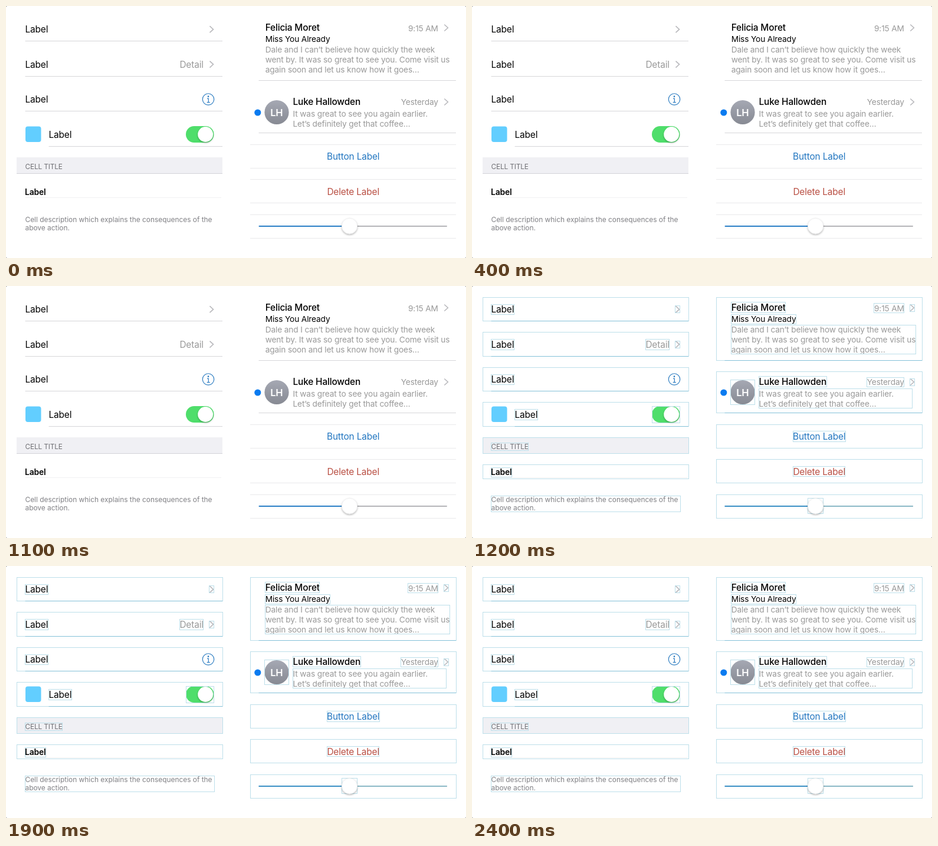
An HTML page for the animation above (2.5 s loop, 780 by 428 pixels).

```html
<!DOCTYPE html>
<html lang="en">
<head>
<meta charset="utf-8">
<title>Table cells</title>
<style>
  html, body { margin: 0; width: 100%; height: 100%; overflow: hidden; background: #fff; }
  svg { display: block; width: 780px; height: 428px; background: #8a8a8a; }
  text {
    font-family: Inter, Roboto, "Liberation Sans", sans-serif;
    font-size: 15.4px; letter-spacing: -0.01em; white-space: pre;
  }
  .strong { font-weight: 500; }
  .small { font-weight: 600; font-size: 13.8px; }
  .body { font-size: 13.7px; }
  .gray { fill: #999; }
  .note { font-size: 11.9px; letter-spacing: 0; fill: #808085; }
  .head { font-size: 11.8px; fill: #707075; }
  .initials { font-size: 16.5px; font-weight: 600; fill: #fff; }
  .mid { text-anchor: middle; }
  .end { text-anchor: end; }
  .blue { fill: #2276c0; }
  .red { fill: #b94f43; }
  #guides { animation: reveal 2500ms step-end infinite; }
  @keyframes reveal { 0% { opacity: 0; } 48%, 100% { opacity: 1; } }
</style>
</head>
<body>
<svg viewBox="0 0 780 428">
  <defs>
    <linearGradient id="silver" x1="0" y1="0" x2="0" y2="1">
      <stop offset="0" stop-color="#a5a8b3"/>
      <stop offset="1" stop-color="#878a93"/>
    </linearGradient>
    <filter id="shade" x="-30%" y="-30%" width="160%" height="170%">
      <feDropShadow dx="0" dy="1.6" stdDeviation="1.4" flood-color="#000" flood-opacity=".3"/>
    </filter>
  </defs>
  <rect width="780" height="428" rx="2.5" fill="#fff"/>
  <g id="cells"></g>
  <g id="guides"></g>
</svg>
<script>
const cells = document.getElementById('cells');
const guides = document.getElementById('guides');
const LEFT = 18, RIGHT = 414, WIDTH = 349, INSET = 14.5;
const PITCH = 59.4, ROW = 40.32;
const BLUE = '#2c7cc1';

function add(parent, tag, attrs, text) {
  const el = document.createElementNS('http://www.w3.org/2000/svg', tag);
  for (const key in attrs) el.setAttribute(key, attrs[key]);
  if (text) el.textContent = text;
  parent.append(el);
  return el;
}

const snap = v => Math.floor(v) + .5;
const block = (x, y, width, height, fill, rx = 0, parent = cells) =>
  add(parent, 'rect', { x, y, width, height, fill, rx });
const disc = (cx, cy, r, fill, extra) => add(cells, 'circle', { cx, cy, r, fill, ...extra });
const line = (d, stroke, width = 1, parent = cells) =>
  add(parent, 'path', { d, fill: 'none', stroke, 'stroke-width': width });

// Every part registers its own layout guide
function guide(x1, y1, x2, y2) {
  const x = snap(x1), y = snap(y1);
  add(guides, 'rect', {
    x, y, width: snap(x2) - x, height: snap(y2) - y, fill: 'none', stroke: '#bddfea'
  });
}

function divider(x1, x2, y, strong = true) {
  const d = `M${x1} ${snap(y)}H${x2}`;
  line(d, strong ? '#d6d6d9' : '#e9e9eb');
  if (strong) line(d, '#84c1d8', 1, guides);
}

function cell(x, y, h, indent) {
  guide(x, y, x + WIDTH, y + h);
  if (indent) divider(x + indent, x + WIDTH, y + h);
}

const write = (x, y, text, style) => add(cells, 'text', { x, y, class: style }, text);

// Text lines with one guide around them; `right` widens it to a column edge
function type(x, y, text, style = '', right = 0) {
  const lines = text.split('\n');
  const els = lines.map((t, i) => write(x, y, t, style));
  const size = parseFloat(getComputedStyle(els[0]).fontSize);
  const leading = size < 13 ? 14 : 16.9;
  els.forEach((el, i) => el.setAttribute('y', y + i * leading));
  const width = els[0].getComputedTextLength();
  const start = x - (style.includes('end') ? width : style.includes('mid') ? width / 2 : 0);
  const last = y + (lines.length - 1) * leading;
  guide(start, y - size * .92, right || start + width, last + size * .22);
}

function chevron(x, y) {
  line(`M${x} ${y - 5.5}l6 5.5l-6 5.5`, '#b9b9bd', 1.6);
  guide(x - 1, y - 6, x + 7, y + 6);
}

// Four standard rows
const rowTop = i => 19.5 + PITCH * i;
const rowMid = i => rowTop(i) + ROW / 2;
for (let i = 0; i < 4; i++) {
  const indent = i < 3 ? INSET : 54.5;
  cell(LEFT, rowTop(i), ROW, indent);
  type(LEFT + indent, rowMid(i) + 5.8, 'Label');
  if (i < 2) chevron(345.5, rowMid(i));
}
type(334.8, rowMid(1) + 5.8, 'Detail', 'gray end');

const infoY = rowMid(2);
disc(343, infoY, 9.7, 'none', { stroke: BLUE, 'stroke-width': 1.2 });
disc(343, infoY - 4.8, 1.3, BLUE);
line(`M341 ${infoY - 1.3}h2.3v6.3m-2.5 .2h5`, BLUE, 1.2);

block(33, 204.5, 26.5, 26.5, '#62ceff', 4);
block(305, 204, 47.5, 28, '#4fde6b', 14);
disc(338.2, 218, 12.9, '#fff', { filter: 'url(#shade)' });
guide(305, 204, 352.5, 232);

// Section
block(LEFT, 257, WIDTH, 28, '#f0f0f4');
line(`M${LEFT} 284.5h${WIDTH}`, '#d3d3d8');
cell(LEFT, 257, 27);
type(LEFT + INSET, 277, 'CELL TITLE', 'head');
line('M33 325.5H365', '#f1f1f2');
cell(LEFT, 303, 24);
type(LEFT + 14, 321, 'Label', 'small');
type(LEFT + INSET, 367,
  'Cell description which explains the consequences of the\nabove action.', 'note', 353);

// Messages
cell(RIGHT, 19, 107, INSET);
type(439.7, 42, 'Felicia Moret', 'strong');
type(732.8, 42.5, '9:15 AM', 'body gray end');
chevron(743.3, 37);
type(439.7, 61, 'Miss You Already', 'body');
type(439.7, 79,
  'Dale and I can’t believe how quickly the week\n' +
  'went by. It was so great to see you. Come visit us\n' +
  'again soon and let us know how it goes…', 'body gray', 752);

cell(RIGHT, 145, 70, INSET);
disc(426.8, 181, 5.6, '#0a7bf0');
disc(459, 180.5, 20.6, 'url(#silver)');
guide(438.4, 159.9, 479.6, 201.1);
write(458.8, 186.7, 'LH', 'initials mid');
type(486.5, 168, 'Luke Hallowden', 'strong');
type(732.8, 168, 'Yesterday', 'body gray end');
chevron(743.3, 163);
type(486.5, 187.6,
  'It was great to see you again earlier.\nLet’s definitely get that coffee…', 'body gray', 746);

// Buttons and slider share the row rhythm
for (let i = 0; i < 3; i++) {
  const y = 235.25 + PITCH * i;
  cell(RIGHT, y, ROW);
  [y, y + ROW].forEach(edge => divider(RIGHT, RIGHT + WIDTH, edge, false));
  const label = ['Button Label', 'Delete Label'][i];
  if (label) type(588.7, y + ROW / 2 + 5.7, label, 'mid ' + ['blue', 'red'][i]);
}

function track(parent, done, rest) {
  block(428.5, 373, 154, 2, done, 1, parent);
  block(582, 373, 166, 2, rest, 1, parent);
}
track(cells, '#2a7fc6', '#b5b5b8');
track(guides, '#3a90c5', '#8bb9c6');
guide(569.3, 360.5, 595.7, 386.9);

// The knob stays above the track in both states
guides.after(disc(582.5, 373.7, 13.2, '#fff',
  { filter: 'url(#shade)', stroke: '#e4e4e6', 'stroke-width': .6 }));
</script>
</body>
</html>
```
